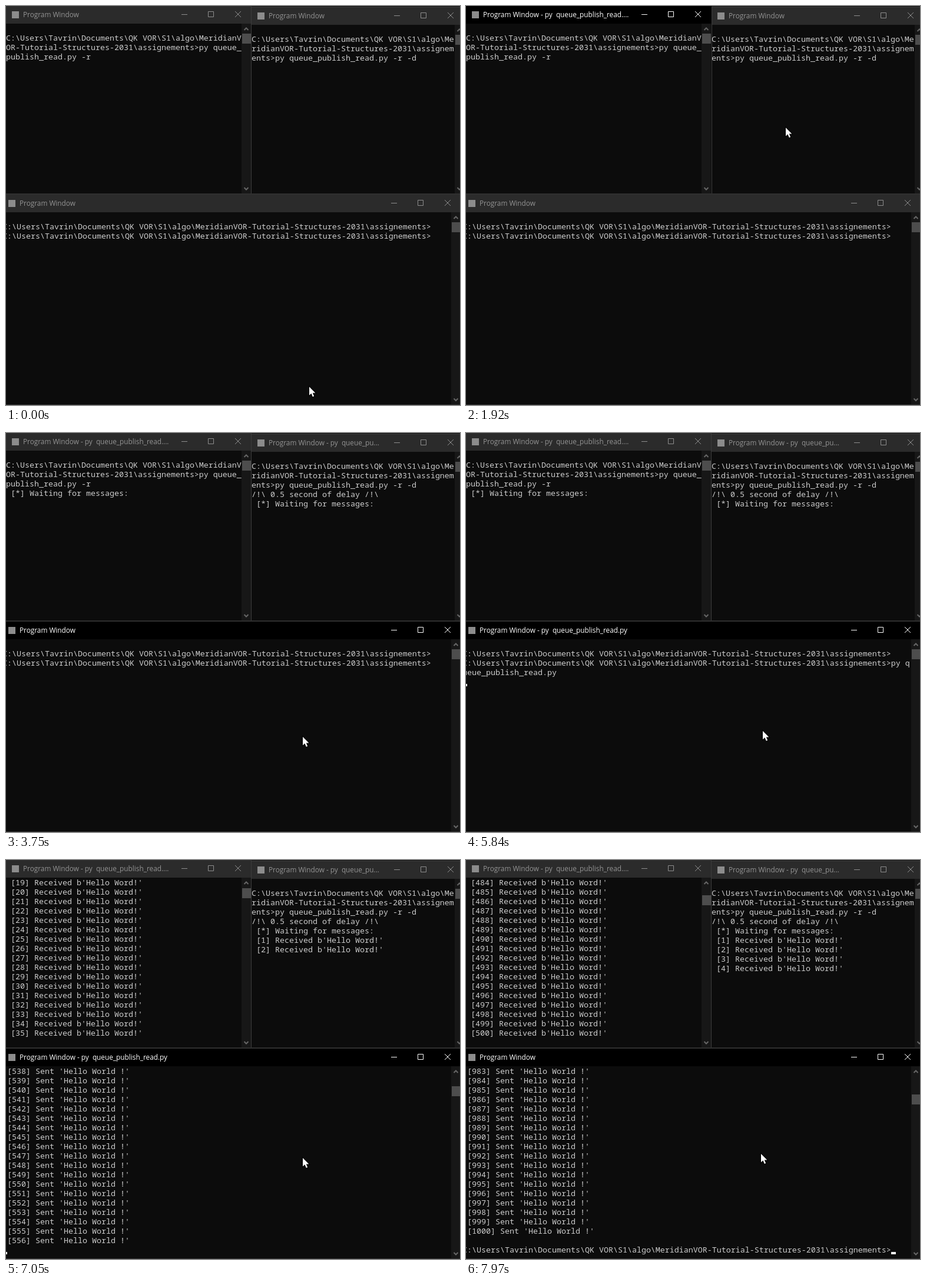
Write an HTML page that moves like this. It is 771 px wide and 679 px high and loops after 8000 ms.

```html
<!DOCTYPE html>
<html lang="en">
<head>
<meta charset="utf-8">
<title>Queue demo</title>
<style>
html, body { margin: 0; width: 100%; height: 100%; overflow: hidden; background: #0c0c0c; }
svg { display: block; width: 771px; height: 679px; }
text { white-space: pre; }
.mono { font: 500 13.333px "Noto Sans Mono", "Liberation Mono", monospace; fill: #ccc; }
.bar { font: 11.8px "Open Sans", "Noto Sans", sans-serif; }
</style>
</head>
<body>
<svg id="stage" viewBox="0 0 771 679"></svg>
<script>
const LOOP = 8000, STEP = 46.66;
const APP = 'Program Window', FILE = 'queue_publish_read.py';
const PROMPT = 'C:\\Users\\Tavrin\\Documents\\QK VOR\\S1\\algo\\MeridianVOR-Tutorial-Structures-2031\\assignements>';
const stage = document.getElementById('stage');

function add(parent, tag, attrs) {
  const el = document.createElementNS('http://www.w3.org/2000/svg', tag);
  for (const k in attrs) el.setAttribute(k, attrs[k]);
  parent.appendChild(el);
  return el;
}
const rect = (p, x, y, width, height, fill) => add(p, 'rect', { x, y, width, height, fill });
const line = (p, d) => add(p, 'path', { d, fill: 'none', stroke: '#666', 'stroke-width': 2 });
function put(el, text) {
  if (el.textContent !== text) el.textContent = text;
}
function wrap(text, cols) {
  const out = [];
  for (let i = 0; i < text.length; i += cols) out.push(text.slice(i, i + cols));
  return out;
}

// x, y, w, h: outer box; top: first text row; tx: text column 0; bar: scrollbar left edge
class Shell {
  constructor(o) {
    Object.assign(this, o);
    const g = add(stage, 'g', {});
    rect(g, o.x, o.y, o.w, o.h, '#0c0c0c');
    this.head = rect(g, o.x, o.y, o.w, o.top - o.y, '#2b2b2b');
    const mid = o.mid;
    rect(g, o.icon + 2, mid - 6, 12, 12, '#8c8c8c');
    this.label = add(g, 'text', { x: o.icon + 21, y: mid + 4, class: 'bar' });
    const b = o.btn, m = mid - 0.5;
    this.buttons = add(g, 'path', {
      d: `M${b - 5} ${m}h10M${b + 40.5} ${m - 5}h9v9h-9zM${b + 86} ${m - 5.5}l10 10m0-10l-10 10`,
      fill: 'none', 'stroke-width': 1
    });
    const end = o.y + o.h, c = o.bar + 8;
    rect(g, o.bar, o.top, 16, end - o.top, '#171717');
    this.thumb = rect(g, o.bar + 1, o.top + 17, 15, 17, '#4d4d4d');
    line(g, `M${c - 3.5} ${o.top + 11}l3.5-3.5 3.5 3.5`);
    line(g, `M${c - 3.5} ${end - 11}l3.5 3.5 3.5-3.5`);
    this.rows = [];
    for (let i = 0; i < o.count; i++) {
      this.rows.push(add(g, 'text', { x: o.tx, y: o.top + 13 + i * 16, class: 'mono' }));
    }
    this.caret = rect(g, 0, 0, 8, 4, '#f2f2f2');
  }
  // lineAt(i) gives line i of total; caret is [row, column] or null
  draw(title, active, total, lineAt, caret) {
    const first = Math.max(0, total - this.count);
    this.rows.forEach((row, i) => put(row, first + i < total ? lineAt(first + i) : ''));
    put(this.label, title);
    this.head.setAttribute('fill', active ? '#000' : '#2b2b2b');
    this.label.setAttribute('fill', active ? '#fff' : '#939393');
    this.buttons.setAttribute('stroke', active ? '#fff' : '#8e8e8e');
    this.thumb.setAttribute('y', Math.round(this.top + 17 + first * this.roll));
    this.caret.setAttribute('visibility', caret ? 'visible' : 'hidden');
    if (caret) {
      this.caret.setAttribute('x', this.tx + caret[1] * 8);
      this.caret.setAttribute('y', this.top + 12 + caret[0] * 16);
    }
  }
}

const left = new Shell({ x: 0, y: 0, w: 417, h: 320, top: 30, mid: 15, icon: 8, btn: 303, bar: 400, tx: 0, count: 18, roll: 0.027 });
const right = new Shell({ x: 417, y: 1, w: 354, h: 319, top: 32, mid: 17, icon: 425, btn: 664, bar: 762, tx: 417, count: 18, roll: 0 });
rect(stage, 417, 0, 354, 1, '#0c0c0c');
rect(stage, 417, 1, 354, 1, '#3c3c3c');
const edge = rect(stage, 416, 1, 1, 319, '#3c3c3c');
const low = new Shell({ x: 0, y: 321, w: 771, h: 358, top: 351, mid: 336, icon: 2, btn: 659, bar: 756, tx: -6, count: 20, roll: 0.0315 });
rect(stage, 0, 319, 771, 2, '#303030');
rect(stage, 0, 678, 771, 1, '#303030');
const pointer = add(stage, 'path', {
  d: 'M0 0V14.5L3.4 11.3 5.8 17 8.2 16 5.8 10.5H10.4Z',
  fill: '#fff', stroke: '#000', 'stroke-width': 2, 'paint-order': 'stroke'
});

// start, end, steps, target x, target y
const moves = [
  [30, 670, 15, 262, 240],
  [1510, 1920, 9, 543, 207],
  [1970, 2290, 7, 538, 222],
  [2330, 2510, 5, 534, 227],
  [2700, 3470, 17, 504, 517],
  [4770, 4950, 5, 504, 507],
  [7000, 7370, 9, 505, 507],
  [7420, 7970, 13, 501, 500]
];
function pointerAt(t) {
  let x = 515, y = 648;
  for (const [a, b, n, tx, ty] of moves) {
    if (t < a) break;
    const k = Math.floor((t - a) / (b - a) * (n - 1) + 1e-6);
    const p = Math.min(1, (k + 1) / n), e = p * p * (3 - 2 * p);
    x += (tx - x) * e;
    y += (ty - y) * e;
  }
  return [x, y];
}

function track(t, keys) {
  if (t <= keys[0][0]) return keys[0][1];
  for (let i = 1; i < keys.length; i++) {
    const [a, u] = keys[i - 1], [b, v] = keys[i];
    if (t <= b) return Math.round(u + (v - u) * (t - a) / (b - a));
  }
  return keys[keys.length - 1][1];
}
const sentKeys = [[6203, 0], [6389, 460], [6640, 460], [6716, 480], [6950, 480], [7369, 821], [7790, 985], [7830, 1000]];
const readKeys = [[6203, 0], [6389, 16], [6640, 16], [6716, 20], [6950, 20], [7369, 88], [7969, 500]];
// the screen refreshes in steps while messages run
function tick(t) {
  const from = t < 7830 ? 6250 : 7830;
  return t < from ? t : from + Math.floor((t - from) / STEP) * STEP;
}

const received = n => ` [${n}] Received b'Hello Word!'`;
const waiting = ' [*] Waiting for messages:';
const leftHead = ['', ...wrap(PROMPT + `py ${FILE} -r`, 50)];
const rightHead = ['', ...wrap(PROMPT + `py ${FILE} -r -d`, 43)];
const typed = wrap(PROMPT + 'py ' + FILE, 95);
const within = (t, a, b) => t >= a && t < b;

function drawLeft(t, read) {
  const lines = t < 2000 ? leftHead : [...leftHead, waiting];
  const base = lines.length;
  left.draw(t < 1320 ? APP : APP + ' - py  queue_publish_read....', within(t, 1230, 2240),
    base + read + 1,
    i => i < base ? lines[i] : i < base + read ? received(i - base + 1) : '',
    within(t, 6389, 6670) ? [0, 0] : null);
}

function drawRight(t) {
  const lines = [...rightHead];
  if (t >= 3010) lines.push('/!\\ 0.5 second of delay /!\\');
  if (t >= 3100) lines.push(waiting);
  for (let n = 1; n <= 4 && t >= 5860 + n * 500; n++) lines.push(received(n));
  right.draw(t < 2420 ? APP : APP + ' - py  queue_pu...', within(t, 2240, 3660),
    lines.length, i => lines[i], null);
}

function drawLow(t, sent) {
  const head = ['', PROMPT, t < 4490 ? PROMPT : typed[0], t < 4770 ? '' : typed[1]];
  const done = t >= 7876;
  const total = 5 + sent + (done ? 1 : 0);
  let caret = null;
  if (within(t, 4260, 4490)) caret = [2, 91];
  else if (within(t, 5280, 5790)) caret = [3, 20];
  else if (within(t, 5800, 7876)) caret = [Math.min(total, 20) - 1, 0];
  else if (t >= 7920) caret = [19, 91];
  low.draw(within(t, 5790, 7876) ? APP + ' - py  ' + FILE : APP, t >= 3660, total,
    i => i < 4 ? head[i] : i < 4 + sent ? ` [${i - 3}] Sent 'Hello World !'` : done && i === total - 1 ? PROMPT : '',
    caret);
}

function render(t) {
  const s = tick(t);
  drawLeft(t, track(s, readKeys));
  drawRight(t);
  drawLow(t, track(s, sentKeys));
  edge.setAttribute('x', within(t, 1230, 2240) ? 417 : 416);
  pointer.setAttribute('transform', `translate(${pointerAt(t).map(Math.round)})`);
}

const start = performance.now();
function frame() {
  render((performance.now() - start) % LOOP);
  requestAnimationFrame(frame);
}
render(0);
requestAnimationFrame(frame);
</script>
</body>
</html>
```
